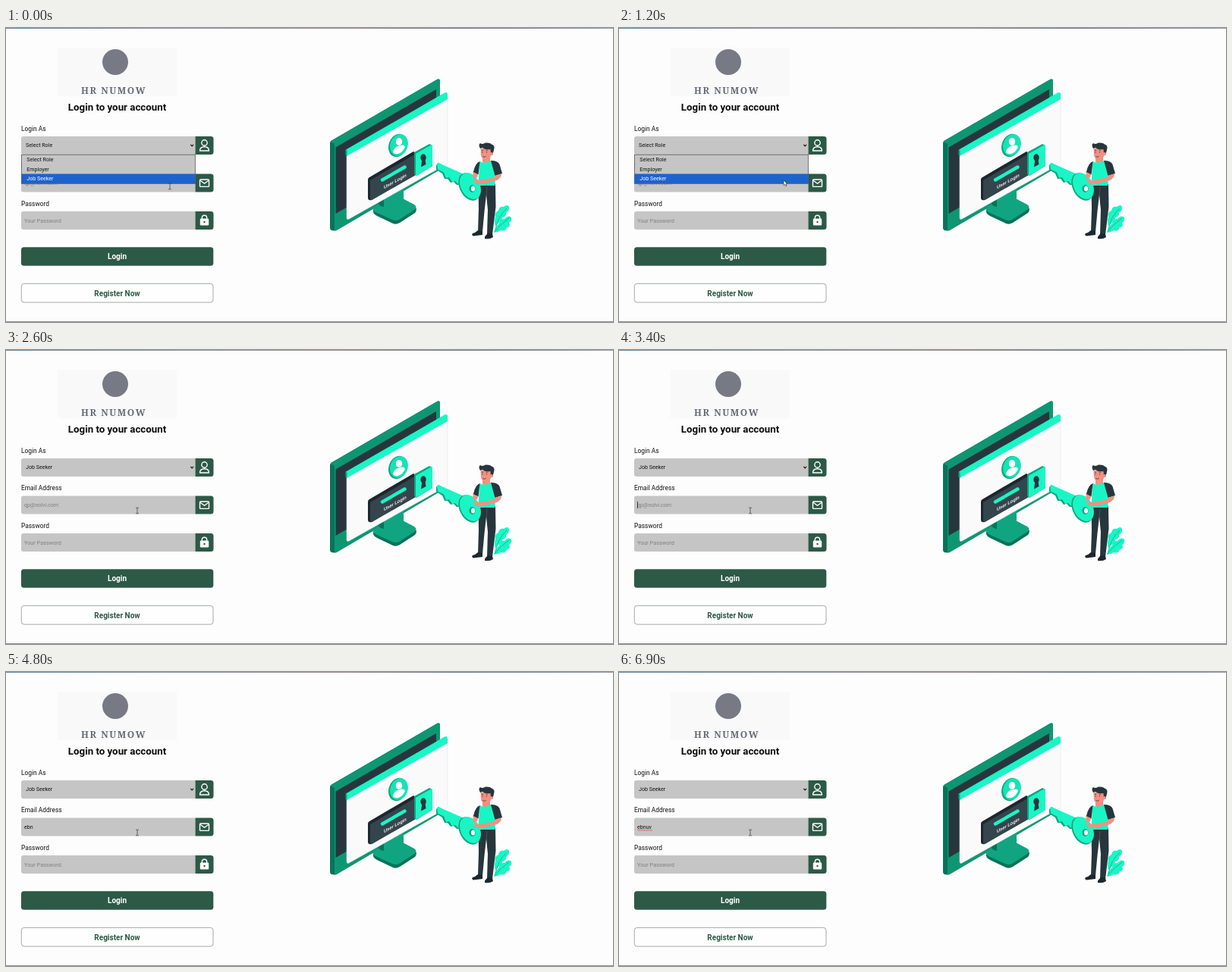
Animation of 800 by 388 pixels, one loop 7 s. Source, as an HTML page:

```html
<!DOCTYPE html>
<html lang="en">
<head>
<meta charset="utf-8">
<title>Login</title>
<style>
  html, body { margin: 0; width: 100%; height: 100%; overflow: hidden; background: #fdfdfd; }
  svg { display: block; width: 800px; height: 388px; font-family: Roboto, sans-serif; }
  .label { font-size: 8.4px; fill: #111; }
  .value { font-size: 7.1px; fill: #111; }
  .hint { font-size: 7.1px; fill: #808080; }
  .button { font-size: 10px; font-weight: 700; text-anchor: middle; }
  .green { fill: #2d5947; }
  .bright { fill: #1af5c5; }
  .teal { fill: #10a580; }
  .bezel { fill: #0e9672; }
  .deep { fill: #08735a; }
  .dark { fill: #27363d; }
  .skin { fill: #f29082; }
  .icon { fill: none; stroke: #fff; stroke-width: 1.4; stroke-linejoin: round; }
</style>
</head>
<body>
<svg viewBox="0 0 800 388">
  <defs>
    <linearGradient id="strip">
      <stop offset="0" stop-color="#6b8ca3"/>
      <stop offset=".3" stop-color="#8d9aa4"/>
      <stop offset=".55" stop-color="#a09294"/>
      <stop offset=".75" stop-color="#75838d"/>
      <stop offset="1" stop-color="#9a9fa8"/>
    </linearGradient>
    <g id="field">
      <path d="M23 0H249.500V24H23Q20 24 20 21V3Q20 0 23 0Z" fill="#c5c5c5"/>
      <path class="green" d="M249.500 0H270Q273.500 0 273.500 3.500V20.500Q273.500 24 270 24H249.500Z"/>
    </g>
  </defs>

  <rect width="800" height="388" fill="#fdfdfd"/>
  <rect width="800" height="1" fill="url(#strip)"/>
  <rect y="387" width="800" height="1" fill="#8d8d8d"/>

  <!-- form -->
  <rect x="68" y="26" width="157" height="64" fill="#f9f9fa"/>
  <circle cx="144" cy="45" r="17" fill="#777985"/>
  <text x="142" y="87" text-anchor="middle" font-size="12" font-weight="600" letter-spacing="1.600" fill="#666875" style="font-family:'Noto Serif',serif">HR NUMOW</text>
  <text x="146.500" y="109" text-anchor="middle" font-size="13.300" font-weight="700" fill="#0b0b0b">Login to your account</text>

  <text class="label" x="20" y="136">Login As</text>
  <text class="label" x="20" y="185.300">Email Address</text>
  <text class="label" x="20" y="234.800">Password</text>
  <use href="#field" y="143"/>
  <use href="#field" y="192.500"/>
  <use href="#field" y="242"/>

  <text class="value" id="role" x="26" y="157.300"></text>
  <path d="M243.300 153.800l1.900 2 1.900-2" fill="none" stroke="#111" stroke-width="1.200"/>
  <text id="email" x="24" y="207"></text>
  <rect id="caret" y="200" width=".8" height="9" fill="#111"/>
  <path id="squiggle" fill="none" stroke="#e0403c" stroke-width=".8"/>
  <text class="hint" x="24" y="256.500" style="font-size:7.300px">Your Password</text>

  <g class="icon">
    <circle cx="261.500" cy="151.500" r="3.700"/>
    <path d="M255.500 162Q255.500 156.700 261.500 156.700T267.500 162Z"/>
    <rect x="255.500" y="200" width="12" height="9.400" rx="1"/>
    <path d="M256 201.300l5.500 4 5.500-4"/>
    <path d="M258.300 252v-1.500a3.200 3.200 0 0 1 6.400 0V252"/>
  </g>
  <rect x="255.800" y="251.500" width="11.400" height="9" rx="1.300" fill="#fff"/>
  <circle class="green" cx="261.500" cy="256" r="1.200"/>

  <rect class="green" x="20" y="289.300" width="253.300" height="24.500" rx="3.500"/>
  <text class="button" x="146.500" y="305.200" fill="#fff">Login</text>
  <rect x="20.300" y="337.400" width="252.700" height="24.700" rx="3.500" fill="#fefefe" stroke="#7d8883" stroke-width=".7"/>
  <text class="button green" x="146.500" y="353.500">Register Now</text>

  <g id="menu">
    <rect x="20.400" y="167.200" width="228.900" height="38" fill="#c5c5c5" stroke="#444" stroke-width=".7"/>
    <rect x="20.400" y="192.500" width="229.200" height="13" fill="#1d63cc"/>
    <text class="value" x="27.300" y="176.200">Select Role</text>
    <text class="value" x="27.300" y="188.500">Employer</text>
    <text class="value" x="27.300" y="201" style="fill:#fff">Job Seeker</text>
  </g>

  <!-- monitor -->
  <path class="deep" d="M427 152Q427 149.500 429 148.500L568 68Q572 66 572 70V184L434 267.500Q427 268 427 264Z"/>
  <path class="bezel" d="M427.500 150L568 68Q572 66 572 71V187L436 267Q433 268.500 433 265V153Z"/>
  <path class="dark" d="M434.500 157.500L567 81V169L434.500 245Z"/>
  <path class="deep" d="M484 239V243Q485 246 490 248.500L510 258Q514 260 519 257L539 244Q541 242 541 238Z"/>
  <path class="teal" d="M486 236L503 225Q512 220 519 223L538 233Q543 236.500 538 240L518 253Q514 255 509 253L487 243Q481 240 486 236Z"/>
  <path class="deep" d="M491 227L515 213V225L498 236Q492 235 491 232Z"/>
  <path class="teal" d="M498 225L524 210V230Q512 240 498 236Z"/>

  <!-- login window -->
  <path d="M449 167L582 91V177Q582 179 580 180L452 252Q449 253.500 449 250Z" fill="#fafafa" stroke="#e2e5e5" stroke-width=".6"/>
  <path class="bright" d="M448 160.500L578 85.500Q582 83.500 582 88V94L449 169Z"/>
  <path class="teal" d="M447.500 160.500L449.500 161.500V169L447.500 168Z"/>
  <ellipse class="teal" cx="516.500" cy="155" rx="12" ry="15.500" transform="rotate(20 516.500 155)"/>
  <ellipse cx="518" cy="154.500" rx="11.500" ry="14.500" transform="rotate(20 518 154.500)" fill="#16e3b6"/>
  <ellipse cx="518" cy="150" rx="4.200" ry="5" fill="#fff"/>
  <path d="M510 164Q511 157 518 155.500 525 153 526 157 523 164 517 166 512 167 510 164Z" fill="#fff"/>

  <path d="M477 200Q477 198 479 197L537 163 541 166V193L482 227Q477 228 477 224Z" fill="#1c282e"/>
  <path d="M480 201L540 166V194L483 226.500Q480 228 480 225Z" fill="#34454d"/>
  <path class="teal" d="M538 164L558 153 562 155V182L541 195 538 193Z"/>
  <path class="bright" d="M540 166L560 154.500Q562 154 562 156V180Q562 182 560 183.500L540 195Z"/>
  <ellipse class="dark" cx="550" cy="171" rx="3.700" ry="4.700"/>
  <path class="dark" d="M548.500 172L552 170.500 553.500 180 547 183.500Z"/>
  <path d="M496 200.500L525.500 183.500" stroke="#1af5c5" stroke-width="4.400" stroke-linecap="round"/>
  <text transform="translate(498 212.500) skewY(-29)" font-size="6.200" font-weight="500" fill="#fff">User Login</text>

  <!-- plant -->
  <g class="bright">
    <path d="M645 262Q643 255 645 249 643 244 649 241 650 235 656 236 661 232 663 236 664 241 659 244 660 249 654 250 654 256 649 257Z"/>
    <path d="M643 270Q645 261 650 258 651 251 657 252 662 246 666 250 667 255 663 257 666 262 660 263 658 269 652 267 648 270 643 270Z"/>
  </g>
  <path d="M645 266Q648 249 660 238M644 269Q652 258 663 251" fill="none" stroke="#12a681" stroke-width=".7"/>

  <!-- man -->
  <path class="dark" d="M622.500 206H645L645.500 236 641 273H634L635 240 633 220 630.500 242 628 269H622L623 238Z"/>
  <path d="M634 210L633 222" stroke="#4a5b63" stroke-width=".8"/>
  <path d="M615 271Q619 270 622 267L628 268V273L616 274.500Q613 273 615 271ZM631 275.500Q633 273 635 271L641 272 642 276Q638 279 631 278Z" fill="#1c282e"/>
  <path class="skin" d="M628 168H638V178Q633 181 628 177Z"/>
  <path class="bright" d="M624 176Q632 180 640 174.500L645 180 644.500 208H622.500Z"/>
  <path class="dark" d="M624.500 176Q619 178 616.500 188L615.500 191 622.500 193.500ZM639 175Q648 175 650.500 180L654 192 644.500 195Z"/>
  <path class="skin" d="M625.500 159L640 158V166Q639 173 632 173.500 627 173.500 626 168Z"/>
  <path class="dark" d="M625 159Q622 154 625 152 628 154 632 151.500 638 151 640 153.500 645 155 643 161L641 168 639 166 638.500 160Q631 161 628 158Z"/>
  <circle class="skin" cx="640" cy="166" r="1.900"/>
  <path d="M628 163v1.500M633.500 163v1.500M627 161.500l2-.3M632.500 161l2.500.4M628.500 169.500q2 1.500 4 0" fill="none" stroke="#27363d" stroke-width=".8"/>

  <!-- key -->
  <path class="teal" d="M567 181L570 178 602 196V207L594 207 590 203 586 204 582 199 578 199 575 192 567 187Z"/>
  <path class="bright" d="M568 179Q570 177.500 572 179L606 194 603 206 596 206 592 202 588 203 584 197 580 198 577 190.500 569 186.500Z"/>
  <ellipse class="teal" cx="610.500" cy="209.500" rx="12.500" ry="19.500" transform="rotate(-27 610.500 209.500)"/>
  <ellipse class="bright" cx="612" cy="208.500" rx="12.500" ry="18.500" transform="rotate(-27 612 208.500)"/>
  <ellipse class="teal" cx="614.500" cy="212" rx="4" ry="5"/>
  <ellipse cx="615.500" cy="212" rx="2.500" ry="3.600" fill="#fafafa"/>
  <path class="skin" d="M616 190L622 193 621 197 617 199 615 196ZM645.500 194.500L653 192.500Q653 198 647 201L628 206Q621 207 617 203L616 200 624 201 643 197.500Z"/>

  <!-- pointer -->
  <path id="beam" d="M-2-4Q0-4 0-3 0-4 2-4M0-3V3M-2 4Q0 4 0 3 0 4 2 4" fill="none" stroke="#444" stroke-width=".8"/>
  <path id="arrow" d="M0 0V6.700L1.600 5.300 2.700 7.800 3.900 7.200 2.800 4.800H4.800Z" fill="#fff" stroke="#222" stroke-width=".6"/>
</svg>
<script>
  const LOOP = 7000, STEP = 100;
  const PICK = 1600, FOCUS = 3000, MARK = 6600;
  const WORD = "ebnuv", HINT = "qp@nolvi.com";
  const KEYS = [3600, 3800, 4000, 5400, 6000];
  // time, x, y
  const PATH = [[0, 216, 209], [300, 216, 209], [700, 217, 202], [2000, 217, 202], [2500, 173, 212], [LOOP, 173, 212]];

  const $ = id => document.getElementById(id);
  const show = (id, on) => $(id).style.display = on ? "" : "none";

  function pointerAt(t) {
    const i = PATH.findIndex(p => p[0] > t);
    const [t0, x0, y0] = PATH[i - 1], [t1, x1, y1] = PATH[i];
    const k = (t - t0) / (t1 - t0), e = k * k * (3 - 2 * k);
    return [x0 + (x1 - x0) * e, y0 + (y1 - y0) * e];
  }

  function draw(t) {
    const open = t < PICK;
    show("menu", open);
    $("role").textContent = open ? "Select Role" : "Job Seeker";

    const count = KEYS.filter(k => k <= t).length;
    const email = $("email");
    email.textContent = count ? WORD.slice(0, count) : HINT;
    email.setAttribute("class", count ? "value" : "hint");

    const end = 24 + (count ? email.getComputedTextLength() : 0);
    const last = count ? KEYS[count - 1] : FOCUS;
    show("caret", t >= FOCUS && Math.floor((t - last) / 500) % 2 === 0);
    $("caret").setAttribute("x", end + .2);

    show("squiggle", t >= MARK);
    let wave = "M24 208.800";
    for (let x = 24; x < end; x += 2) wave += "q.5-.9 1 0t1 0";
    $("squiggle").setAttribute("d", wave);

    const [x, y] = pointerAt(t), arrow = open && y < 206;
    show("arrow", arrow);
    show("beam", !arrow);
    $(arrow ? "arrow" : "beam").setAttribute("transform", `translate(${x} ${y - (arrow ? 1 : 0)})`);
  }

  function tick() {
    draw(Math.floor(performance.now() % LOOP / STEP) * STEP);
    requestAnimationFrame(tick);
  }
  tick();
</script>
</body>
</html>
```
